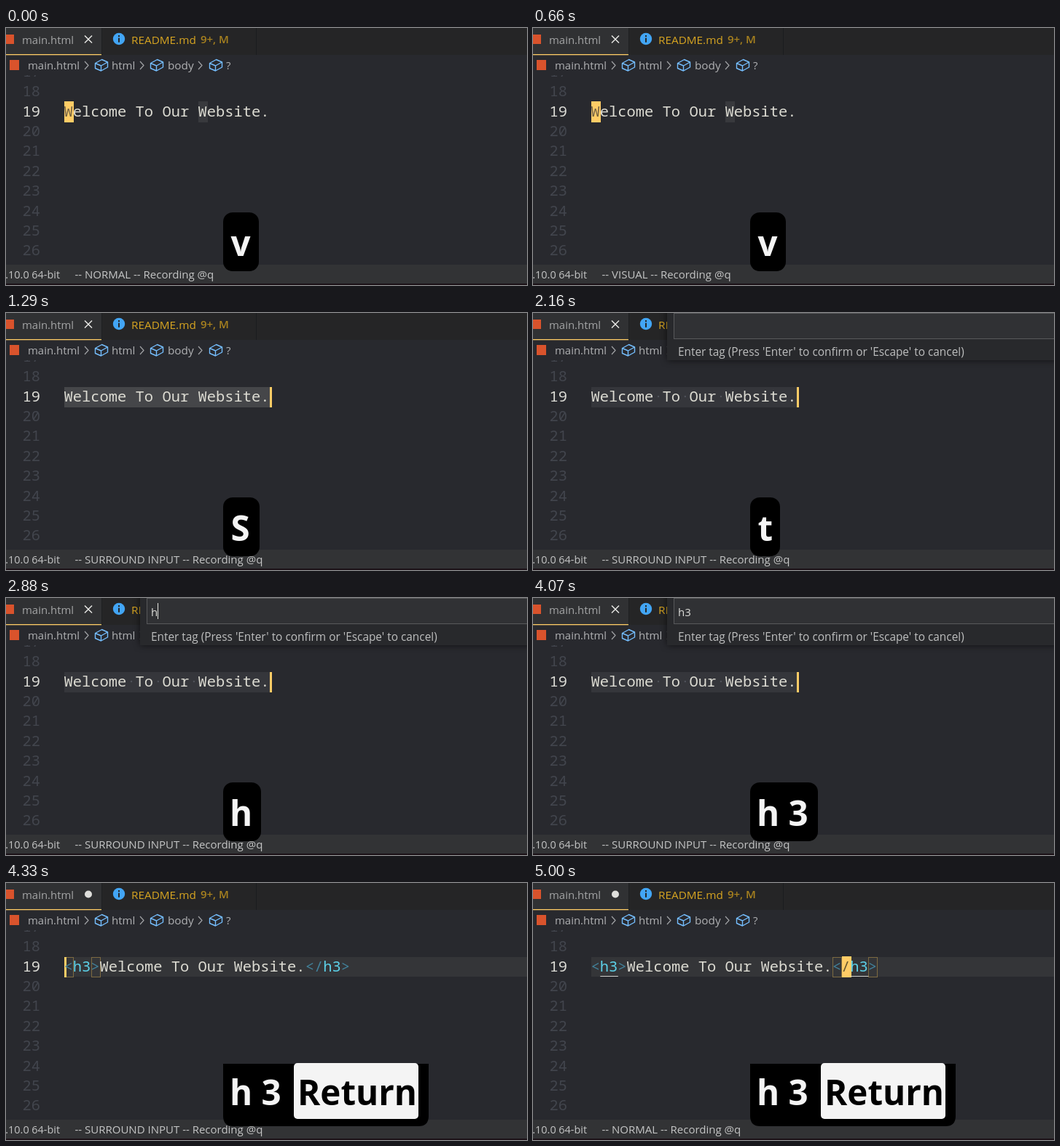
These frames come from a looping animation (715 px wide and 354 px high, 5.07 s). An HTML page:

```html
<!DOCTYPE html>
<html lang="en">
<head>
<meta charset="utf-8">
<title>Surround with a tag</title>
<style>
html, body { margin: 0; width: 100%; height: 100%; overflow: hidden; background: #28292e; }
svg { display: block; font: 15px "Open Sans", "Noto Sans", sans-serif; }
.code { font: 500 20.45px "Noto Sans Mono", "DejaVu Sans Mono", monospace; }
.key { font-size: 47.5px; font-weight: 700; }
</style>
</head>
<body>
<svg id="stage" width="715" height="354" viewBox="0 0 715 354"></svg>
<script>
const LOOP = 5070, CHAR = 12.27, LINE = 27.4;
const YELLOW = '#ffcc66', CYAN = '#5ccfe6', PUNCT = '#42819a', FG = '#dddcd3';
const SENTENCE = 'Welcome To Our Website.';
const stage = document.getElementById('stage');

const col = n => 80 + n * CHAR;
const escapeText = s => s.replace(/&/g, '&amp;').replace(/</g, '&lt;');
const rect = (x, y, w, h, fill, more = '') =>
  `<rect x="${x}" y="${y}" width="${w}" height="${h}" fill="${fill}" ${more}/>`;
const text = (x, y, s, fill, more = '') =>
  `<text x="${x}" y="${y}" fill="${fill}" ${more}>${escapeText(s)}</text>`;
const path = (d, stroke, width = 1.2) =>
  `<path d="${d}" fill="none" stroke="${stroke}" stroke-width="${width}" stroke-linejoin="round"/>`;
const code = (n, s, fill) => text(col(n) - .5, 121.5, s, fill, 'class="code"');
const block = (n, fill) => rect(Math.round(col(n)), 101, 13, 29, fill);
const bracket = n =>
  rect(Math.round(col(n)) + .5, 102.5, 12, 27, 'none', 'stroke="#7d6a41"');

// Latest entry whose start time has passed.
const at = (t, steps) => steps.filter(([start]) => start <= t).pop()[1];

function stateAt(t) {
  return {
    mode: at(t, [[0, 'NORMAL'], [660, 'VISUAL'], [1290, 'SURROUND INPUT'], [5000, 'NORMAL']]),
    keys: at(t, [[0, 'v'], [960, '$'], [1290, 'S'], [1620, 't'], [2880, 'h'], [3480, 'h 3'], [4270, 'Return']]),
    view: at(t, [[0, 'start'], [960, 'toEnd'], [1290, 'selected'], [1620, 'prompt'],
      [4270, 'selected'], [4330, 'wrapped'], [5000, 'done']]),
    input: at(t, [[0, ''], [2880, 'h'], [3480, 'h3']]),
    caret: at(t, [[0, 199], [2160, 0], [2620, 199], [2880, 208], [3410, 0], [3480, 216], [4070, 0]])
  };
}

function lineNumbers(active) {
  let out = '';
  for (let n = 17; n <= 26; n++)
    out += text(22.5, 121.5 + (n - 19) * LINE, n + '', n === active ? '#dcdcd6' : '#42454d', 'class="code"');
  return out;
}

function editor(view) {
  let out = lineNumbers(view === 'toEnd' ? 20 : 19);
  if (view === 'start')
    return out + block(0, YELLOW) + block(15, '#38393d') + code(0, SENTENCE, FG) + code(0, 'W', '#775f32');

  if (view === 'wrapped' || view === 'done') {
    const done = view === 'done';
    out += rect(80, 102, 635, 27, '#343538');
    if (done) out += block(28, YELLOW) + bracket(27) + bracket(31);
    else out += bracket(0) + bracket(3) + rect(80, 102, 3, 28, YELLOW);
    out += code(0, '<', PUNCT) + code(1, 'h3', CYAN) + code(3, '>', PUNCT) +
      code(4, SENTENCE, FG) + code(27, '<', PUNCT) +
      code(28, '/', done ? '#66552f' : PUNCT) + code(29, 'h3', CYAN) + code(31, '>', PUNCT);
    if (done)
      for (const n of [1, 29]) out += rect(col(n), 128, 2 * CHAR, 1, '#d0d0cc');
    return out;
  }

  const inPrompt = view === 'prompt';
  out += rect(80, 102, 282, 28, inPrompt ? '#35363b' : '#454649');
  if (inPrompt)
    for (const n of [7, 10, 14]) out += `<circle cx="${col(n + .5)}" cy="115" r="1.2" fill="#50525a"/>`;
  out += view === 'toEnd' ? block(23, YELLOW) : rect(362, 102, 3, 28, YELLOW);
  return out + code(0, SENTENCE, FG);
}

const chevron = x => path(`M${x} 46l5 5.5l-5 5.5`, '#a0a2a5');
const cube = x => path(
  `M${x} 48.5l9-5l8 3.5v7l-9 5l-8-3.5zl8 3.5l9-5M${x + 8} 52v7`, '#75beff', 1.4);

function header(dirty) {
  const crumb = '#b0b1b3', gold = '#d6a421';
  return rect(0, 37, 715, 28, '#28292e') +
    rect(0, 0, 715, 37, '#252526') + rect(0, 0, 131, 37, '#303133') +
    rect(131, 0, 1, 37, '#1f2022') + rect(343, 0, 1, 37, '#1b1c1e') +
    rect(0, 36, 131, 1.3, YELLOW) +
    rect(0, 9, 11, 13, '#d9532c') + text(22, 22, 'main.html', '#a4a5a6', 'font-size="14.9"') +
    (dirty ? '<circle cx="113" cy="15.5" r="5" fill="#dededb"/>'
           : path('M108 10.5l10 10M118 10.5l-10 10', '#e6e6e3', 1.5)) +
    '<circle cx="155" cy="15" r="8.2" fill="#42a5f5"/>' +
    rect(154, 10, 2, 2.2, '#252526') + rect(154, 13.7, 2, 6, '#252526') +
    text(172, 22, 'README.md', gold, 'font-size="15.3"') +
    text(267, 20.5, '9+, M', '#a8821f', 'font-weight="600"') +
    rect(5, 44, 13, 14, '#d9532c') + text(30, 57, 'main.html', crumb, 'font-size="14.9"') +
    chevron(108) + cube(122.5) + text(145, 57, 'html', crumb) +
    chevron(184) + cube(198.5) + text(222, 57, 'body', crumb, 'font-size="15.3"') +
    chevron(264) + cube(279.5) + text(302, 57, '?', crumb);
}

function prompt({ input, caret }) {
  return rect(184, -20, 560, 85, '#28292c', 'style="filter:drop-shadow(0 0 5px #0009)"') +
    rect(193.5, .5, 530, 35, '#303134', 'stroke="#58595b"') +
    text(199, 25, input, '#dededa') +
    (caret ? rect(caret, 7, 1, 22, '#e4e4e0') : '') +
    text(199, 59, "Enter tag (Press 'Enter' to confirm or 'Escape' to cancel)", '#bebfbf', 'font-size="15.4"');
}

function status(mode) {
  return rect(0, 326, 715, 26, '#323335') + rect(0, 352, 715, 2, '#1c1218') +
    text(74, 345, '.10.0 64-bit', '#c4c5c5', 'font-size="14.4" text-anchor="end"') +
    text(94.5, 345, `-- ${mode} -- Recording @q`, '#c4c5c5');
}

function keyCaps(keys) {
  const white = '#f4f4f4', big = 'class="key"';
  if (keys === 'Return')
    return '<path d="M298 249H580V321q0 14-14 14H312q-14 0-14-14z"/>' +
      rect(395, 248, 171, 77, white, 'rx="5"') +
      text(307, 306, 'h 3', white, big) + text(400, 306, keys, '#000', big);
  const width = { v: 49, $: 50, S: 50, t: 41, h: 52, 'h 3': 93 }[keys];
  return rect(298, 254, width, 81, '#000', 'rx="13"') +
    text(keys[0] === 'h' ? 307 : 308.5, 314, keys, white, big);
}

const begin = performance.now();
let shown = '';
function draw() {
  const s = stateAt((performance.now() - begin) % LOOP);
  const id = JSON.stringify(s);
  if (id !== shown) {
    shown = id;
    const dirty = s.view === 'wrapped' || s.view === 'done';
    stage.innerHTML = rect(0, 0, 715, 354, '#28292e') + editor(s.view) + header(dirty) +
      (s.view === 'prompt' ? prompt(s) : '') + status(s.mode) + keyCaps(s.keys);
  }
  requestAnimationFrame(draw);
}
draw();
</script>
</body>
</html>
```
